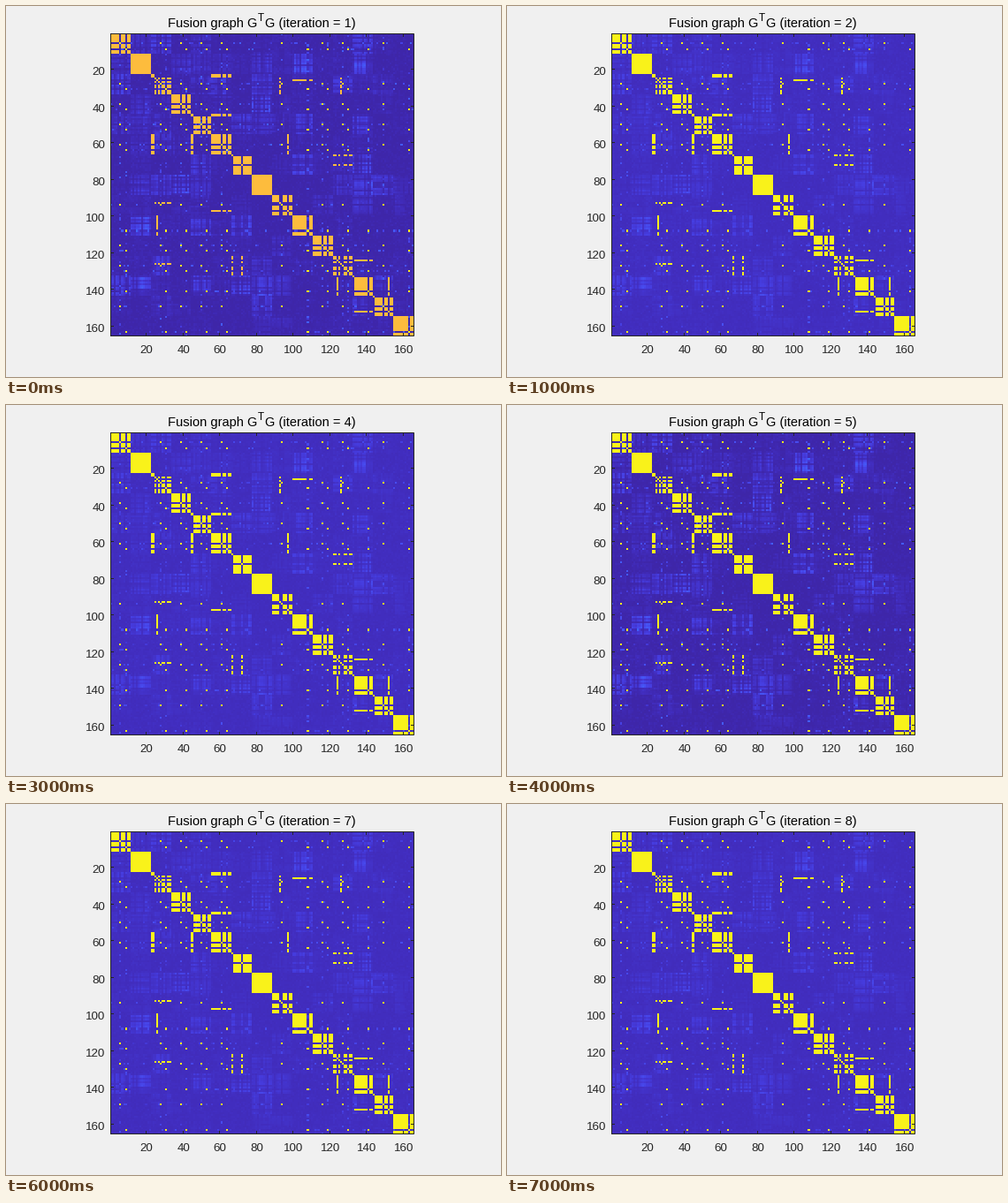
Recreate the animation shown at these times as a matplotlib script. Size 560 by 420 pixels, loop 8000 ms.

```python
import numpy as np
import matplotlib.pyplot as plt
from matplotlib.animation import FuncAnimation
from matplotlib.colors import LinearSegmentedColormap

W, H, DPI = 560, 420, 100
PER, CLASSES = 11, 15
N = PER * CLASSES
LEFT, TOP, SIDE = 118, 31, 343
CELL = SIDE / N
INK = "#262626"

PARULA = LinearSegmentedColormap.from_list("parula", [
    (0, "#3e26a8"), (.032, "#422ebf"), (.079, "#463cde"), (.127, "#484df0"),
    (.222, "#3e6fff"), (.5, "#1abdb8"), (.8, "#fdbc3d"), (1, "#f9fb15")])


def link(mask, a, b):
    mask[np.ix_(a, b)] = True
    mask[np.ix_(b, a)] = True


# Side-lit samples sit at positions 5 and 8 of a class and link across
# classes; strays join the class of another person.
HOMES = {2: [92, 125], 5: [22, 23, 44, 96], 9: [25],
         11: [66, 71], 12: [123, 151]}
STRAYS = sum(HOMES.values(), [])
LONERS = [132, 143]


def lit_samples(pos, unlit):
    return [k * PER + pos for k in range(CLASSES)
            if k not in unlit and k * PER + pos not in STRAYS]


LIT = [lit_samples(5, {1, 7, 9, 12, 14}), lit_samples(8, {1, 6, 7})]
ALL_LIT = LIT[0] + LIT[1]
APART = set(ALL_LIT + STRAYS + LONERS)

blocks = np.eye(N, dtype=bool)
for k in range(CLASSES):
    group = [i for i in range(k * PER, (k + 1) * PER) if i not in APART]
    link(blocks, group, group)
    for stray in HOMES.get(k, []):
        link(blocks, group, [stray])
link(blocks, [22, 23], [22, 23])

dots = np.zeros((N, N), dtype=bool)
for lit in LIT:
    link(dots, lit, lit)

# Class pairs whose faint similarity is easiest to see.
KIN = [(6, 12), (6, 9), (7, 12), (0, 2), (1, 9), (1, 12), (3, 7)]


def make_plaid():
    """Faint symmetric texture: class tiles, stripes, grain and specks."""
    rng = np.random.default_rng(7)
    tile = rng.gamma(.6, .035, (CLASSES, CLASSES)).clip(0, .08)
    for a, b in KIN:
        tile[a, b] = rng.uniform(.08, .13)
    tile = np.triu(tile, 1)
    tile += tile.T

    stripe = rng.uniform(.45, 1.2, (N, CLASSES))
    stripe[rng.random((N, CLASSES)) < .2] = .2
    stripe[ALL_LIT] *= .3
    wide = np.repeat(stripe, PER, axis=1)
    plaid = np.kron(tile, np.ones((PER, PER))) * wide * wide.T

    grain = np.triu(np.abs(rng.normal(0, .008, (N, N))))
    specks = np.zeros((N, N))
    specks[ALL_LIT] = rng.uniform(.03, .17, (len(ALL_LIT), N))
    specks *= rng.random((N, N)) < .09
    return plaid + grain + grain.T + np.maximum(specks, specks.T)


PLAID = make_plaid()


def graph(step):
    """Similarity matrix after the given iteration (1-based)."""
    sharp = step in (1, 5)
    g = PLAID.copy() if sharp else .029 + (.66 - .015 * step) * PLAID
    g[blocks] = .8 if step == 1 else .97
    g[dots] = .96
    return g


plt.rcParams["font.family"] = "Liberation Sans"
fig = plt.figure(figsize=(W / DPI, H / DPI), dpi=DPI, facecolor="#f0f0f0")
ax = fig.add_axes([0, 0, 1, 1])
ax.axis("off")
image = ax.imshow(graph(1), cmap=PARULA, vmin=0, vmax=1, aspect="auto",
                  interpolation="nearest",
                  extent=(LEFT, LEFT + SIDE, TOP + SIDE, TOP))
ax.set_xlim(0, W)
ax.set_ylim(H, 0)


def stroke(xs, ys):
    ax.plot(xs, ys, color=INK, lw=72 / DPI, snap=False,
            solid_capstyle="projecting", solid_joinstyle="miter")


def label(x, y, s, px=13.33, color=INK, ha="left"):
    return ax.text(x, y, s, fontsize=px * 72 / DPI, color=color, ha=ha,
                   va="baseline")


X0, X1, Y0, Y1 = 118.5, 461.5, 31.5, 373.5
stroke([X0, X1, X1, X0, X0], [Y0, Y0, Y1, Y1, Y0])
for t in range(20, N, 20):
    x = LEFT + (t - .5) * CELL
    y = TOP + (t - .5) * CELL
    px, py = int(x) + .5, int(y) + .5
    for edge, d in ((Y0, 3), (Y1, -3)):
        stroke([px, px], [edge, edge + d])
    for edge, d in ((X0, 3), (X1, -3)):
        stroke([edge, edge + d], [py, py])
    label(x + .5, 393, str(t), ha="center")
    label(112.5, y + 6.4, str(t), ha="right")

label(183, 24, "Fusion graph G", 14.67, "black")
label(284.7, 17.3, "T", 11.7, "black")
title = label(292.6, 24, "", 14.67, "black")


def update(i):
    image.set_data(graph(i + 1))
    title.set_text(f"G (iteration = {i + 1})")
    return image, title


anim = FuncAnimation(fig, update, frames=8, interval=1000, repeat=True,
                     repeat_delay=0, blit=False)
plt.show()
```
